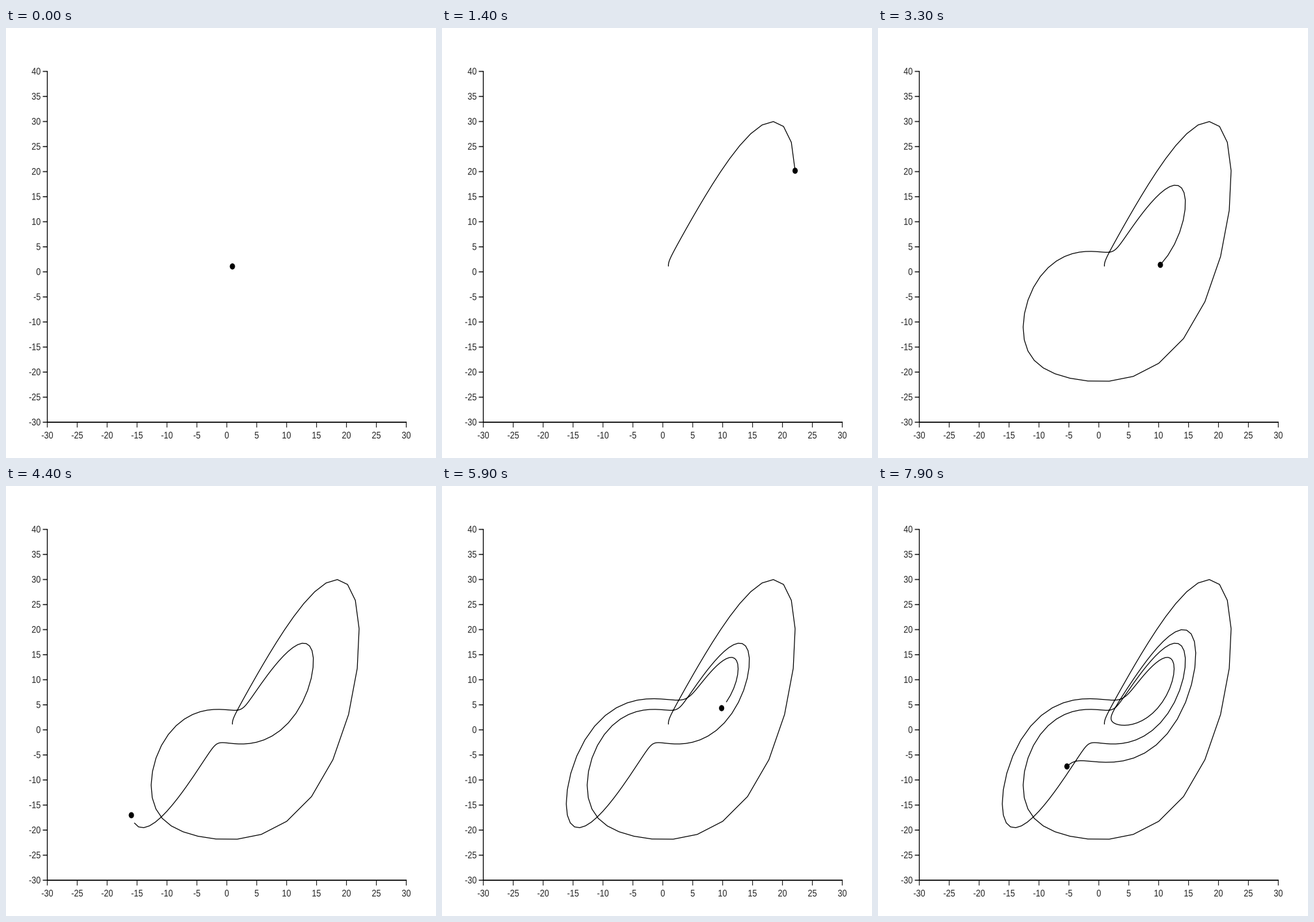
Write a matplotlib script that moves like this. It is 660 px wide and 660 px high and loops after 8 s.

```python
import numpy as np
import matplotlib.pyplot as plt
from matplotlib.animation import FuncAnimation
from matplotlib.patches import Ellipse, PathPatch
from matplotlib.textpath import TextPath
from matplotlib.transforms import Affine2D

SIZE, DPI = 660, 100
PX = 72 / DPI                  # one pixel in points
SX, SY = 1.148, 1.346          # the whole chart is scaled unevenly
LEFT, RIGHT, TOP, BOTTOM = 63.4, 614.4, 66.6, 605.1
TICK_MS, LOOP_MS = 100, 8000

# Playback speed varies: integration steps reached at given times (ms)
TIMES = [600, 1400, 2200, 3300, 4400, 5000, 5900, 6800, 7700, 7900]
STEPS = [1, 25, 50, 90, 132, 153, 180, 218, 240, 246]
LAG_FROM = 4400                # from here the trail is one step behind the dot


def to_x(v):
    return LEFT + (v + 30) / 60 * (RIGHT - LEFT)


def to_y(v):
    return BOTTOM - (v + 30) / 70 * (BOTTOM - TOP)


def lorenz(count, dt=0.015, sigma=10, rho=28, beta=8 / 3):
    """Euler integration of the Lorenz system, returned as x, y points."""
    x = y = z = 1.0
    points = [(x, y)]
    for _ in range(count):
        dx = sigma * (y - x)
        dy = x * (rho - z) - y
        dz = x * y - beta * z
        x, y, z = x + dx * dt, y + dy * dt, z + dz * dt
        points.append((x, y))
    return np.array(points)


fig = plt.figure(figsize=(SIZE / DPI, SIZE / DPI), dpi=DPI, facecolor="white")
ax = fig.add_axes([0, 0, 1, 1])
ax.set_xlim(0, SIZE)
ax.set_ylim(SIZE, 0)
ax.axis("off")


def line(xs, ys, width, color="black"):
    ax.plot(xs, ys, color=color, lw=width * PX, solid_capstyle="butt",
            snap=False)


def label(text, x, baseline, align):
    path = TextPath((0, 0), text, size=11, prop={"family": "Liberation Sans"})
    box = path.get_extents()
    anchor = box.x1 if align == "right" else (box.x0 + box.x1) / 2
    place = Affine2D().translate(-anchor, 0).scale(SX, -SY)
    place.translate(x, baseline)
    ax.add_patch(PathPatch(place.transform_path(path), fc="#222222", lw=0))


def draw_axes():
    for v in range(-30, 41, 5):
        y = to_y(v)
        line([LEFT - 6 * SX, LEFT], [y, y], 1.6, "#222222")
        label(str(v), 52.8, y + 4.8, "right")
    for v in range(-30, 31, 5):
        x = to_x(v)
        line([x, x], [BOTTOM, BOTTOM + 6 * SY], 1.2, "#222222")
        label(str(v), x, 630, "center")
    line([LEFT, LEFT], [TOP - SY / 2, BOTTOM + SY / 2], 1.3)
    line([LEFT, RIGHT + SX / 2], [BOTTOM, BOTTOM], 1.7)


draw_axes()
# Axis lines sit half a unit off the data
points = lorenz(STEPS[-1])
px = to_x(points[:, 0]) - SX / 2
py = to_y(points[:, 1]) - SY / 2

trail, = ax.plot([], [], color="black", lw=1.25 * PX, snap=False,
                 solid_joinstyle="miter", solid_capstyle="butt")
dot = Ellipse((px[0], py[0]), 7 * SX, 7 * SY, fc="black", lw=0, zorder=5)
ax.add_patch(dot)


def update(frame):
    t = frame * TICK_MS
    step = 0 if t < TIMES[0] else int(round(np.interp(t, TIMES, STEPS)))
    end = step - 1 if t >= LAG_FROM else step
    trail.set_data(px[:end + 1], py[:end + 1])
    dot.set_center((px[step], py[step]))
    return trail, dot


def reset():
    return update(0)


anim = FuncAnimation(fig, update, frames=LOOP_MS // TICK_MS, init_func=reset,
                     interval=TICK_MS, repeat=True, repeat_delay=0)
plt.show()
```
